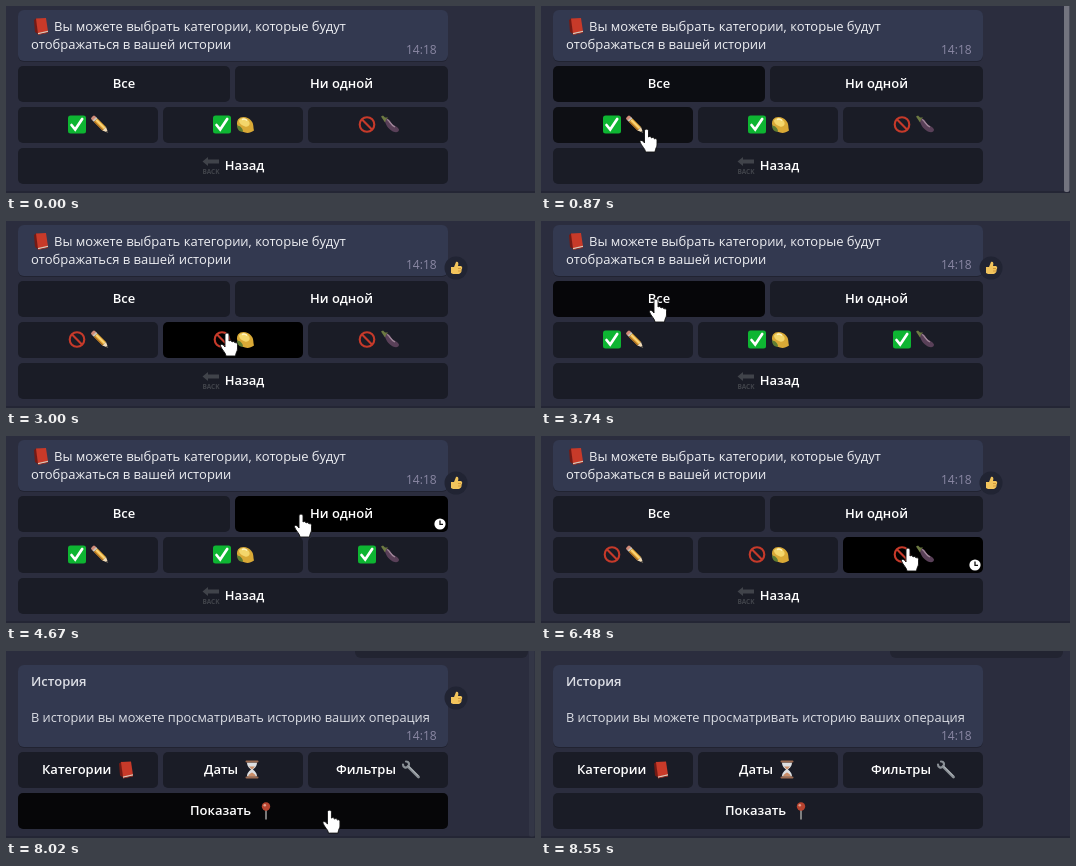
An HTML page that plays this animation: 529x187 px, repeating every 8.95 s.

```html
<!DOCTYPE html>
<html lang="ru">
<head>
<meta charset="utf-8">
<title>Категории истории</title>
<style>
  html, body { margin: 0; width: 100%; height: 100%; overflow: hidden; background: #2b2d3e; }
  svg { display: block; width: 529px; height: 187px; }
  text { font: 13px "Open Sans", "Noto Sans", sans-serif; fill: #eeeff3; white-space: pre; }
  .bold { font-weight: 600; fill: #fff; }
  #history .soft { fill: #dcdee5; }
  #history .body { font-size: 12.8px; }
  .time { font-size: 12px; fill: #8b88a4; }
  .back { font: bold 6.5px "Open Sans", sans-serif; fill: #40434a; }
</style>
</head>
<body>
<svg id="stage" viewBox="0 0 529 187" xmlns="http://www.w3.org/2000/svg">
  <defs>
    <g id="book">
      <path d="M-7-6-4-8-3 8-6 6Z" fill="#741a14"/>
      <path d="M-5-7.500 5-8 7 5.500-3 8Z" fill="#c83a29"/>
      <path d="M-3 7 7 4.800V6.500L-3 8.700Z" fill="#d8c8b8"/>
      <path d="M-3 8.200 7 6V7L-3 9Z" fill="#8d211a"/>
    </g>
    <g id="check">
      <rect x="-9" y="-9" width="18" height="18" rx="2.500" fill="#0eb532"/>
      <path d="M-5.500.500-1.800 5 5.200-5.500" fill="none" stroke="#fff" stroke-width="2.700" stroke-linecap="round"/>
    </g>
    <g id="ban" fill="none" stroke="#c63a2a" stroke-width="2.100">
      <circle r="7.300"/><path d="M-5.200-5.200 5.200 5.200"/>
    </g>
    <g id="pencil" transform="rotate(45)">
      <rect x="-11" y="-2.500" width="4" height="5" rx="1.500" fill="#d08a78"/>
      <rect x="-8" y="-2.500" width="2" height="5" fill="#c9c4b8"/>
      <rect x="-6" y="-2.500" width="12" height="5" fill="#e8ab3c"/>
      <rect x="-6" y="-1.300" width="12" height="1.500" fill="#fad77c"/>
      <rect x="-6" y="1.300" width="12" height="1.200" fill="#a86a20"/>
      <path d="M6-2.500 11.500 0 6 2.500Z" fill="#f2dcb8"/><path d="M9.500-1 11.700 0 9.500 1Z" fill="#333"/>
    </g>
    <g id="lemon">
      <path d="M-7-5C-4-9 3-8 6-4 9-1 8 2 9 6 6 8 3 9 0 8-6 7-10 0-7-5Z" fill="#d9a936"/>
      <path d="M-6-4C-3-8 2-6 4-3 6 0 3 3 0 2-3 1-6-1-6-4Z" fill="#f3d66b"/>
      <path d="M-3-5C-1-6 1-5 2-4" fill="none" stroke="#fff3c0" stroke-width="1.500"/>
      <path d="M-8 1C-5 1-2 4-2 7-5 8-8 5-8 1Z" fill="#5f7d32"/>
    </g>
    <g id="eggplant">
      <path d="M-6-6C-3-7 0-5 1-2 3 1 8 2 9 5 9 9 3 8 0 5-3 3-5-2-6-6Z" fill="#594058"/>
      <path d="M-3-5C0-4 0 0 5 2.500" fill="none" stroke="#a48b9d" stroke-width="1.300"/>
      <path d="M-9-8-7-9-5-7-2-7-4-5-5-2-7-5Z" fill="#6d7a42"/>
    </g>
    <g id="back">
      <path d="M-8.500-4-3-8.500V-6H8V-2H-3V.500Z" fill="#40434a"/>
      <text class="back" y="8" text-anchor="middle">BACK</text>
    </g>
    <g id="hourglass">
      <path d="M-5-7H5C5-3 2-1 1 0 2 1 5 3 5 7H-5C-5 3-2 1-1 0-2-1-5-3-5-7Z" fill="#dcdfe2"/>
      <path d="M-3-3H3L0 0ZM-4 7C-3 4 0 3 0 3S3 4 4 7Z" fill="#c98d68"/>
      <path d="M-5.500-8H5.500M-5.500 8H5.500" stroke="#9a6a50" stroke-width="2" stroke-linecap="round"/>
    </g>
    <g id="wrench" fill="none" stroke="#8a9096" stroke-linecap="round">
      <path d="M-3-3 7.500 7.500" stroke-width="2.800"/>
      <path d="M-5-8C-2-8-1-5-3-3-5-1-8-2-8-5" stroke-width="2.200"/>
      <path d="M-2-3 7 6" stroke="#c9ced2" stroke-width=".8"/>
    </g>
    <g id="pin">
      <path d="M0-1V8.500" stroke="#a0a09f" stroke-width="1.500" stroke-linecap="round"/>
      <circle cy="-4" r="4.200" fill="#b8432f"/><circle cx="-1.200" cy="-5.200" r="1.300" fill="#e0a08e"/>
    </g>
    <g id="clock">
      <circle r="5.600" fill="#fff"/>
      <path d="M0-3.400V.400H3" fill="none" stroke="#111" stroke-width="1.300"/>
    </g>
  </defs>
  <rect width="529" height="187" fill="#2b2d3e"/>
  <rect y="185" width="529" height="2" fill="#242635"/>
  <g id="picker">
    <rect x="12" y="5" width="430" height="51" rx="6" fill="#212331"/>
    <rect x="12" y="4" width="430" height="51" rx="6" fill="#333950"/>
    <use href="#book" x="35" y="20"/>
    <text x="48" y="25">Вы можете выбрать категории, которые будут</text>
    <text x="25" y="43">отображаться в вашей истории</text>
    <text class="time" x="400" y="48">14:18</text>
  </g>
  <g id="history">
    <rect x="349" y="-20" width="173" height="27" rx="6" fill="#222431"/>
    <rect x="12" y="15" width="430" height="82" rx="6" fill="#212331"/>
    <rect x="12" y="14" width="430" height="82" rx="6" fill="#333950"/>
    <text class="bold soft" x="25" y="35">История</text>
    <text class="soft body" x="25" y="71">В истории вы можете просматривать историю ваших операция</text>
    <text class="time" x="400" y="89">14:18</text>
  </g>
  <g id="reaction" transform="translate(450 47)">
    <circle r="11.500" fill="#212433"/>
    <path d="M-5-1H-2L0-6C2-7 3-5 2-2H5C7-1 6 1 5.500 2 6 4 4 6 2 6H-3L-5 5Z" fill="#f2c45c"/>
    <path d="M2 .500H5M2 3H5" stroke="#c98f35" stroke-width=".8"/>
  </g>
  <rect id="scrollbar" x="523" y="-4" width="5.500" height="190" rx="2" fill="#73747f"/>
  <g id="cursor" stroke="#111" stroke-width=".9" stroke-linejoin="round" fill="#fff">
    <path id="hand" d="M-2 2C-2-.500 2-.500 2 2V8C3 7 5 7.500 5 9 6 8 8 8.500 8 10 9 9 10.500 10 10.500 11.500V16C10.500 18 9 19 8.500 23H-1C-1 20-5 17-6.500 13-7 11-4 10.500-2 14Z"/>
    <path id="arrow" d="M0 0V16L4 12.500 6.500 18.500 9 17.500 6.500 11.700H11.500Z"/>
  </g>
</svg>
<script>
const LOOP = 8950, FADE = 180, SWITCH = 7880;
const $ = id => document.getElementById(id);
const clamp = v => Math.max(0, Math.min(1, v));
const within = (t, spans) => spans.some(([a, b]) => t >= a && t < b);
const fade = (t, spans) => Math.max(0, ...spans.map(([a, b]) =>
  Math.min(clamp((t - a) / FADE), 1 - clamp((t - b) / FADE))));
const show = (el, on) => el.setAttribute("display", on ? "inline" : "none");

function add(parent, tag, attrs, text) {
  const el = document.createElementNS("http://www.w3.org/2000/svg", tag);
  for (const key in attrs) el.setAttribute(key, attrs[key]);
  if (text) el.textContent = text;
  return parent.appendChild(el);
}

// A null labelX centres the label. Returns the first icon.
const buttons = [];
function button(screen, x, y, w, label, labelX, icons, hover = [], wait = []) {
  const g = add($(screen), "g", {});
  const box = add(g, "rect", { x, y, width: w, height: 36, rx: 5 });
  const centred = labelX === null;
  add(g, "text", { class: "bold", x: centred ? x + w / 2 : labelX, y: y + 22,
    "text-anchor": centred ? "middle" : "start" }, label);
  const uses = icons.map(([name, ix]) => add(g, "use", { href: "#" + name, x: ix, y: y + 17.5 }));
  const clock = add(g, "use", { href: "#clock", x: x + w - 8, y: y + 28 });
  buttons.push({ screen, x, y, w, box, clock, hover, wait });
  return uses[0];
}

button("picker", 12, 60, 212, "Все", null, [], [[620, 785], [3120, 3700]], [[3470, 3740]]);
button("picker", 229, 60, 213, "Ни одной", null, [], [[4200, 4810], [4820, 5800]], [[4640, 4810]]);
const marks = [
  button("picker", 12, 101, 140, "", 0, [["check", 71], ["pencil", 94]], [[785, 1870]], [[1400, 1600]]),
  button("picker", 157, 101, 140, "", 0, [["check", 216], ["lemon", 239]], [[1870, 3110]], [[2440, 2670]]),
  button("picker", 302, 101, 140, "", 0, [["ban", 361], ["eggplant", 384]], [[5810, 7120]], [[6420, 6680]])
];
button("picker", 12, 142, 430, "Назад", 218.7, [["back", 205]], [[7130, LOOP]], [[7620, SWITCH]]);
button("history", 12, 101, 140, "Категории", 36, [["book", 120]]);
button("history", 157, 101, 140, "Даты", 198, [["hourglass", 246]]);
button("history", 302, 101, 140, "Фильтры", 330, [["wrench", 405]]);
button("history", 12, 142, 430, "Показать", 184, [["pin", 260]], [[SWITCH, 8200]]);

// Spans in which each category is ticked.
const ticked = [
  [[0, 1600], [3740, 4880]],
  [[0, 2670], [3740, 4880]],
  [[3740, 4880], [6680, LOOP]]
];

// Pointer stops: time, x, y.
const stops = [
  [270, 470, -25], [600, 160, 56], [740, 120, 84], [870, 105.5, 123],
  [1740, 105.5, 123], [2140, 227, 118], [2870, 227, 118], [3000, 221, 112], [3270, 115, 78],
  [4070, 115, 78], [4410, 295, 78], [5610, 295, 78], [6010, 367, 112],
  [7010, 367, 112], [7350, 323, 159], [8010, 323, 159], [8350, 470, 190]
];

function pointer(t) {
  const i = stops.findIndex(s => s[0] > t);
  if (i < 1) return null;
  const [t0, x0, y0] = stops[i - 1], [t1, x1, y1] = stops[i];
  const p = (t - t0) / (t1 - t0), e = p * p * (3 - 2 * p);
  return [x0 + (x1 - x0) * e, y0 + (y1 - y0) * e];
}

function shade(level) {
  return `rgb(${[26, 28, 38].map(c => Math.round(c * (1 - level)))})`;
}

function draw(t) {
  const screen = t < SWITCH ? "picker" : "history";
  for (const name of ["picker", "history"]) show($(name), name === screen);
  for (const b of buttons) {
    b.box.setAttribute("fill", shade(fade(t, b.hover)));
    show(b.clock, within(t, b.wait));
  }
  marks.forEach((m, i) => m.setAttribute("href", within(t, ticked[i]) ? "#check" : "#ban"));
  $("reaction").setAttribute("opacity", fade(t, [[1200, 8050]]));
  $("scrollbar").setAttribute("opacity", fade(t, [[340, 1200], [8000, 8330]]));

  const at = pointer(t);
  show($("cursor"), at);
  if (!at) return;
  const [x, y] = at;
  const over = buttons.some(b => b.screen === screen &&
    x >= b.x && x <= b.x + b.w && y >= b.y && y <= b.y + 36);
  $("cursor").setAttribute("transform", `translate(${x} ${y})`);
  show($("hand"), over);
  show($("arrow"), !over);
}

const start = performance.now();
function tick() {
  draw((performance.now() - start) % LOOP);
  requestAnimationFrame(tick);
}
tick();
</script>
</body>
</html>
```
